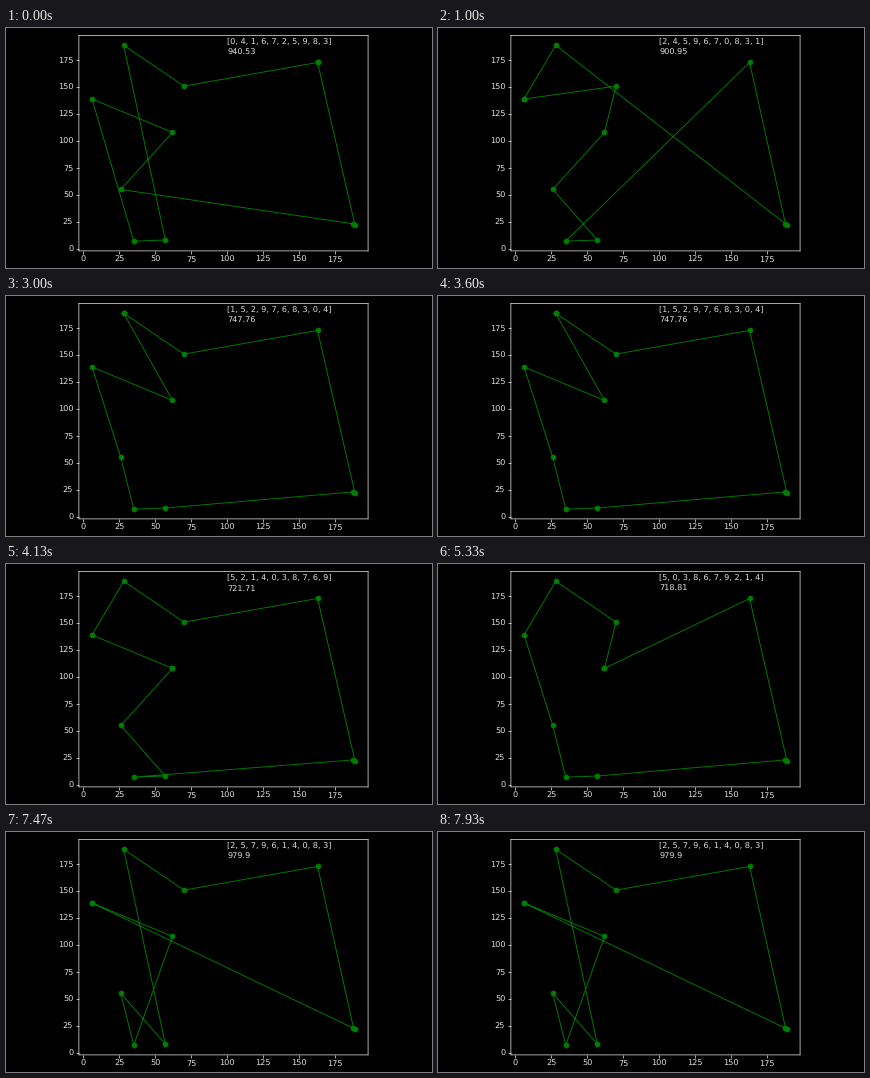
Recreate the animation shown at these times as a matplotlib script. Size 426 px wide and 240 px high, loop 8000 ms.

```python
import math

import matplotlib.pyplot as plt
from matplotlib.animation import FuncAnimation

W, H, DPI = 426, 240, 100
SCALE = 0.583  # stage size relative to a default 640 x 480 figure
LEFT, BOTTOM = 72.9, 17.1
AX_W, AX_H = 0.775 * 640 * SCALE, 0.77 * 480 * SCALE
MARGIN = 0.05

CITIES = [(163, 173), (28, 189), (6, 139), (189, 22), (70, 151),
          (62, 108), (57, 8), (35, 7), (188, 23), (26, 55)]

# second it appears: order in which the cities are visited
GENOMES = {0: "0416725983", 1: "2459670831", 3: "1529768304",
           4: "5214038769", 5: "5038679214", 7: "2579614083"}


def padded(values):
    low, high = min(values), max(values)
    pad = MARGIN * (high - low)
    return low - pad, high + pad


plt.rcParams.update({"font.family": "DejaVu Sans", "font.size": 10 * SCALE,
                     "text.color": "#dcdcdc", "text.hinting": "none"})
fig = plt.figure(figsize=(W / DPI, H / DPI), dpi=DPI, facecolor="black")
ax = fig.add_axes([LEFT / W, BOTTOM / H, AX_W / W, AX_H / H], facecolor="black")
xs, ys = zip(*CITIES)
ax.set(xlim=padded(xs), ylim=padded(ys),
       xticks=range(0, 176, 25), yticks=range(0, 176, 25))
ax.tick_params(color="white", labelcolor="#dcdcdc", labelsize=10 * SCALE,
               length=3.5 * SCALE, width=0.8 * SCALE, pad=3.5 * SCALE)
ax.tick_params(axis="x", pad=2.4 * SCALE)
for spine in ax.spines.values():
    spine.set(color="white", linewidth=0.8 * SCALE, snap=False)

route, = ax.plot([], [], "o-", color="green", lw=1.1 * SCALE,
                 ms=6 * SCALE, mew=SCALE, snap=False)
genome_label = ax.text(100, 190, "")
length_label = ax.text(100, 180, "")


def draw(second):
    latest = max(start for start in GENOMES if start <= second)
    genome = [int(gene) for gene in GENOMES[latest]]
    path = [CITIES[i] for i in genome + genome[:1]]
    length = sum(math.dist(p, q) for p, q in zip(path, path[1:]))
    route.set_data(*zip(*path))
    genome_label.set_text(str(genome))
    length_label.set_text(str(round(length, 2)))
    return route, genome_label, length_label


anim = FuncAnimation(fig, draw, frames=8, interval=1000, repeat=True,
                     repeat_delay=0)
plt.show()
```
